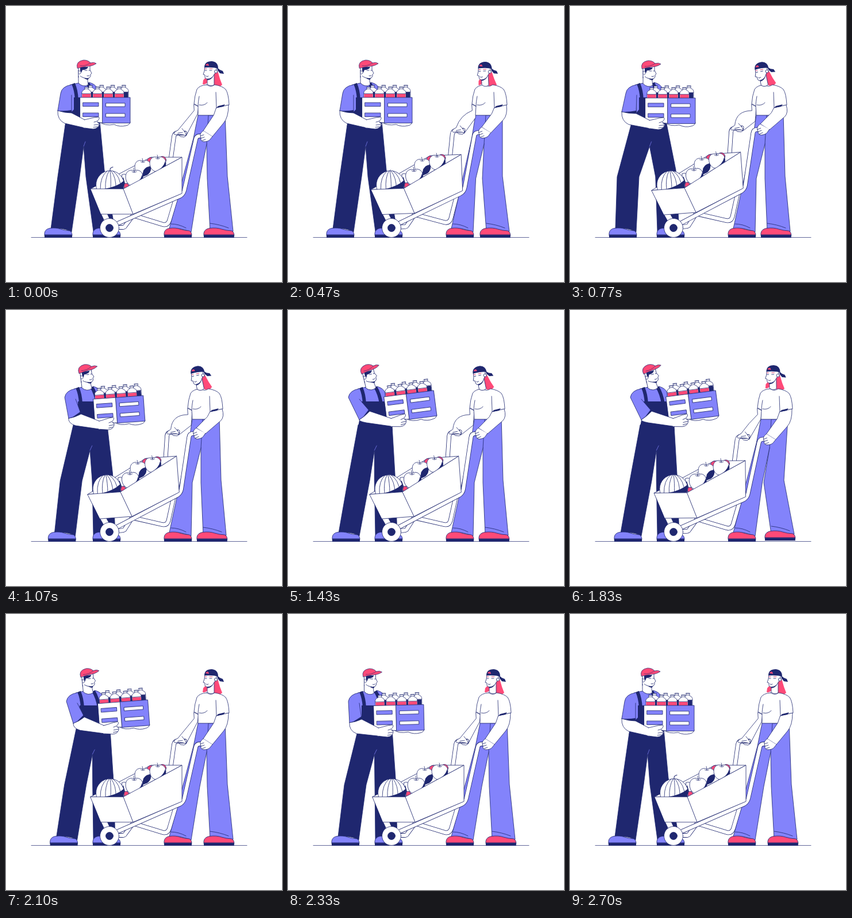
These frames come from a looping animation (480x480 px, 3000 ms). An HTML page:

```html
<!DOCTYPE html>
<html lang="en">
<head>
<meta charset="utf-8">
<title>Market delivery</title>
<style>
html, body { margin: 0; width: 100%; height: 100%; overflow: hidden; background: #fff; }
svg { display: block; width: 100vw; height: 100vh; }
</style>
</head>
<body>
<svg id="stage" viewBox="0 0 480 480" stroke-linejoin="round" stroke-linecap="round"></svg>
<script>
const NS = 'http://www.w3.org/2000/svg';
const NAVY = '#1f276f', LILAC = '#8383fb', PINK = '#ff4a78', WHITE = '#fff';
const LOOP = 3000;
const stage = document.getElementById('stage');

function add(parent, tag, attrs) {
  const node = document.createElementNS(NS, tag);
  for (const key in attrs) node.setAttribute(key, attrs[key]);
  parent.appendChild(node);
  return node;
}
const group = parent => add(parent, 'g', {});
const shape = (parent, fill, d = '', line = 0.8) =>
  add(parent, 'path', { d, fill, stroke: NAVY, 'stroke-width': line });
const flat = (parent, fill, d = '') => add(parent, 'path', { d, fill });
const line = (parent, d = '', color = NAVY, width = 0.8) =>
  add(parent, 'path', { d, fill: 'none', stroke: color, 'stroke-width': width });
const disc = (parent, cx, cy, r, fill) =>
  add(parent, 'circle', { cx, cy, r, fill, stroke: NAVY, 'stroke-width': 0.8 });
const box = (parent, x, y, width, height, fill) =>
  add(parent, 'rect', { x, y, width, height, fill, stroke: NAVY, 'stroke-width': 0.8 });

function tube(parent, d) {
  line(parent, d, NAVY, 7.8);
  line(parent, d, WHITE, 6.2);
}

// Smooth, never overshooting curve through [time, ...values] rows.
function track(rows) {
  const n = rows.length;
  const rate = (i, k) => (rows[i + 1][k] - rows[i][k]) / (rows[i + 1][0] - rows[i][0]);
  const slope = (i, k) => {
    if (i === 0 || i === n - 1) return 0;
    const a = rate(i - 1, k), b = rate(i, k);
    return a * b > 0 ? 2 * a * b / (a + b) : 0;
  };
  return t => {
    if (t <= rows[0][0]) return rows[0].slice(1);
    if (t >= rows[n - 1][0]) return rows[n - 1].slice(1);
    let i = 0;
    while (t > rows[i + 1][0]) i++;
    const span = rows[i + 1][0] - rows[i][0], u = (t - rows[i][0]) / span;
    const s = u * u * (3 - 2 * u);
    return rows[i].slice(1).map((v, j) => {
      const k = j + 1;
      return v + (rows[i + 1][k] - v) * s
        + span * u * (1 - u) * ((1 - u) * slope(i, k) - u * slope(i + 1, k));
    });
  };
}

function turn(x, y, deg, ox = 0, oy = 0) {
  const a = deg * Math.PI / 180, c = Math.cos(a), s = Math.sin(a);
  return [ox + (x - ox) * c - (y - oy) * s, oy + (x - ox) * s + (y - oy) * c];
}

// hip, kneeL, kneeR, shoe, torso, headX, headY, headTurn, sleeve outer xy, inner xy, elbow, crate xy, crateTurn
const manRest = [0, 0, 0, 0, 0, 0, 0, 0, 90, 182, 114, 186, 20, 129, 159, 0];
const manLift = [18, 14, 15, 10, 10, 9, 0, -13, 124, 191, 142, 176, 3, 167, 151, -7.3];
const manAt = track([
  [520, ...manRest],
  [770, 4, -8, 13, 1, 2, 1, 1, 0, 90, 184, 115, 187, 20, 131, 160, 0],
  [1330, ...manLift],
  [1830, ...manLift],
  [2330, 18, 8, 16, 9, 10, 6.5, 1, 0, 107, 189, 128, 183, 17, 149, 159.5, -1.3],
  [2700, ...manRest]
]);

// barrow turn, shirt, hip, headX, headY, headTurn, shoe, lift, knee, stem
const womanRest = [0, 0, 0, 0, 0, 0, 0, 0, 0, 1];
const womanLean = [-4.2, -11, -10, -18, 1, -12, -12, 0, -11, 0];
const womanAt = track([
  [200, ...womanRest],
  [470, -2.2, -7, -8, -13, 1, -3, -10, 0, -12, 0.4],
  [740, ...womanLean],
  [1410, ...womanLean],
  [1830, -0.5, -1, -2, -3, 0, -1, -5, -2, -13, 0],
  [2100, ...womanRest]
]);

function shoe(parent, color, x, size = 1) {
  const g = group(parent);
  shape(g, color, 'M0-4V-8Q1-15 9-16.5Q20-18 28-15Q35-12.5 44-12Q48-10 48-4Z');
  flat(g, NAVY, 'M0-5.5H48V0H0Z');
  return (dx, dy = 0) => g.setAttribute('transform', `translate(${x + dx} ${403 + dy}) scale(${size} 1)`);
}

line(stage, 'M44 402.5H419', NAVY, 0.7);

// Man
const man = group(stage);
const manLegs = shape(man, NAVY);
const manCrease = line(man, '', LILAC, 0.7);
const manShoe = shoe(man, LILAC, 67);
shoe(man, LILAC, 151)(0);
const manShirt = shape(man, LILAC);
const manBib = flat(man, NAVY);
const straps = line(man, '', NAVY, 6);
straps.setAttribute('stroke-linecap', 'butt');
const manSleeve = shape(man, LILAC);
const manCuff = flat(man, NAVY);

const manHead = group(man);
shape(manHead, WHITE, 'M126 113V134Q134 142 143 137L141 122Z');
flat(manHead, NAVY, 'M134 123Q138 127 144 125L143 128Q137 128 134 123Z');
shape(manHead, WHITE, 'M126 106V118Q130 125 141 126Q146 126 147 122L147 119L149 117L146 111V103Z');
flat(manHead, WHITE, 'M125.5 113H129V122H125.5Z');
line(manHead, 'M126 112V124');
flat(manHead, NAVY, 'M129 106H143L141 109Q135 112 133 111L131 116L129 112Z');
line(manHead, 'M127 113Q131 112 130 117Q129 119 127 118', NAVY, 0.7);
line(manHead, 'M137 112H141M144 112H146M141 121.5Q143 122 145 121', NAVY, 0.8);
shape(manHead, PINK, 'M124 108Q121 96 135 94Q143 94 147 99Q153 97 157 100Q150 105 140 105Z', 0.7);
line(manHead, 'M129 104Q138 105 147 99', NAVY, 0.6);

const crate = group(man);
shape(crate, WHITE, 'M34 43Q43 50 59 47Q69 52 80 49Q86 48 87 43Z');
function bottle(x, top, band) {
  const g = group(crate);
  g.setAttribute('transform', `translate(${x} ${top})`);
  shape(g, WHITE, `M-8 ${-top}V10Q-8 7-3 5V1H3V5Q8 7 8 10V${-top}Z`, 0.7);
  flat(g, band, `M-7.5 13H7.5V${-top}H-7.5Z`);
  line(g, 'M-3.5 1H3.5M-3 4H3M-8 12.5H8', NAVY, 0.7);
}
for (let i = 0; i < 4; i++) bottle(18 + 19.3 * i, -22, NAVY);
for (let i = 0; i < 4; i++) bottle(11 + 19 * i, -19, PINK);
shape(crate, WHITE, 'M0 0H39V44L0 42Z');
shape(crate, LILAC, 'M39 0H87V44.5H39Z');
for (const y of [9, 27]) {
  box(crate, 5, y, 27, 6.5, LILAC);
  box(crate, 45, y + 1, 33, 6, WHITE);
}
const manArm = shape(man, WHITE);
const manHand = group(man);
flat(manHand, WHITE, 'M4 39L8 39L34 34Q35 39 29 43L34 46Q32 54 23 55L6 53Z');
line(manHand, 'M7 39Q16 37 24 35L32 34Q35 36 30 41L24 43M30 42Q34 44 33 47Q31 55 22 55L7 53M32 47L24 48M30 51L23 52');

// Woman legs
const woman = group(stage);
const farLeg = shape(woman, LILAC);
const nearLeg = shape(woman, LILAC);
const folds = line(woman);
shoe(woman, PINK, 275)(0);
const womanShoe = shoe(woman, PINK, 344, 1.1);

// Barrow
const farArm = shape(stage, WHITE);
const barrow = group(stage);
tube(barrow, 'M311 221H299Q293 221 292 227L287 263');
line(barrow, 'M311 217.5V224.5');
shape(barrow, WHITE, 'M147 318L252 263H306L204 318Z');

function apple(x, y, r) {
  const g = group(barrow);
  g.setAttribute('transform', `translate(${x} ${y}) scale(${r / 15})`);
  shape(g, WHITE, 'M0-12C6-16 15-12 15-2C15 8 8 15 0 14C-8 15-15 8-15-2C-15-12-6-16 0-12Z');
  flat(g, NAVY, 'M14-6Q18 6 8 14Q2 17-5 14Q10 8 14-6Z');
  line(g, 'M-4-11Q0-8 4-11M0-10Q0-14-1-17');
}
disc(barrow, 272, 268, 6.5, PINK);
disc(barrow, 252, 270, 6.5, PINK);
apple(238, 281, 14);
flat(barrow, NAVY, 'M236 298L239 286Q244 278 252 279Q253 288 247 293Z');
apple(264, 275, 14);
shape(barrow, WHITE, 'M202 293Q208 291 212 296L211 310L202 312Z');
flat(barrow, NAVY, 'M198 304L204 298L208 312L204 318Z');
disc(barrow, 209, 313, 4.5, PINK);
apple(223, 299, 15);
disc(barrow, 181, 311, 24.5, WHITE);
flat(barrow, NAVY, 'M171 318Q194 314 205 304Q206 311 204 318Z');
line(barrow, 'M176 287Q164 296 164 318M179 287Q172 300 173 318M181 287Q183 300 182 318M183 287Q192 299 191 318M186 287Q199 296 200 318', NAVY, 0.8);
const stem = line(barrow, 'M0 0Q-1-6 5-7', NAVY, 1.1);

tube(barrow, 'M295 336L284 373Q281 382 273 380L224 365');
tube(barrow, 'M221 364L207 383Q206 385 202 385H186');
tube(barrow, 'M342 226H337Q331 226 330 232L310 321Q308 328 302 331L188 381');
shape(barrow, WHITE, 'M165 361L173 378L182 374L176 361Z');
shape(barrow, WHITE, 'M204 318L306 263V326L221 362Z');
shape(barrow, WHITE, 'M147 318H204L221 362H165Z');
disc(barrow, 180, 386, 16.5, WHITE);
disc(barrow, 180, 386, 6.5, NAVY);

// Woman upper body
const upper = group(stage);
const backHair = group(upper);
flat(backHair, PINK, 'M361 114Q367 110 369 116Q372 128 376 137Q370 143 362 138Z');
const sideHair = flat(backHair, PINK);
const shirt = shape(upper, WHITE);
const seams = line(upper);
const womanHead = group(upper);
flat(womanHead, WHITE, 'M350 121V136Q356 141 362 137V117Z');
line(womanHead, 'M350 126V136Q356 141 362 137V119');
flat(womanHead, NAVY, 'M350 126Q357 127 361 121Q358 128 350 129Z');
shape(womanHead, WHITE, 'M346 104L345 113L343 119L346 120Q345 127 350 127Q358 127 362 119L366 113V104Z');
disc(womanHead, 365, 114, 2.6, WHITE);
line(womanHead, 'M346 112H349M354 112H358M348 122Q350 123.5 352 122', NAVY, 0.8);
line(womanHead, 'M346 109H349M354 109H359', PINK, 1);
flat(womanHead, NAVY, 'M345 107Q345 96 358 96Q369 97 369 109Q361 106 345 107Z');
flat(womanHead, NAVY, 'M367 107L372 111L377 113L379 118L372 117L368 112Z');
flat(womanHead, PINK, 'M347 103Q349 99 352 101L353 104Z');

const farHand = group(upper);
shape(farHand, WHITE, 'M-6-6Q-12-4-13 0Q-12 3-6 1L3 2L8 4Q9 0 5-4L1-9');
line(farHand, 'M-6-1L2-2M-6 1L-2 5L5 6L9 2');
const nearArm = shape(upper, WHITE);
const cuff = flat(upper, NAVY);
const nearHand = group(upper);
flat(nearHand, WHITE, 'M-4-11Q-10-7-9-2L-8 2Q-9 7-3 8Q5 8 8 4L12-1Z');
line(nearHand, 'M-4-11Q-10-7-9-2L-8 2Q-9 7-3 8Q5 8 8 4L12-1M-9-2L-3-4M-8 2L-2 0M-6 6L0 4');

const setD = (node, d) => node.setAttribute('d', d);
const move = (node, value) => node.setAttribute('transform', value);

function drawMan(t) {
  const [h, kl, kr, s, b, hx, hy, ha, ox, oy, ix, iy, drop, cx, cy, ca] = manAt(t);
  const crotch = `${135 + h * 0.85} 244`;
  setD(manLegs, `M${104 + h} 200L${90 + kl} 297L${78 + s} 388Q${98 + s} 384 ${114 + s} 393
    L${128 + kl} 297L${crotch}L${139 + kr * 0.75} 297L152 392H190L${171 + kr} 285L${163 + h} 200Z`);
  setD(manCrease, `M${138 + h * 0.9} 236L${crotch}`);
  manShoe(s);
  setD(manShirt, `M${112 + b} 137L${126 + b} 134Q${135 + b} 142 ${145 + b} 133
    Q${156 + b} 136 ${159 + b} 144L${159 + b} 185H${114 + b}Z`);
  setD(manBib, `M${118 + b} 159L${118 + b} 180L${106 + h} 192L${102.5 + h} 210H${163.5 + h}
    L${161 + h} 185L${158 + b} 159Z`);
  setD(straps, `M${117 + b} 135Q${122 + b} 146 ${123 + b} 163M${142 + b} 134Q${149 + b} 145 ${152 + b} 163`);
  setD(manSleeve, `M${113 + b} 137Q${97 + b} 140 ${95 + b} 152L${ox} ${oy}
    Q${(ox + ix) / 2} ${(oy + iy) / 2 + 2} ${ix} ${iy}L${114 + b} 155`);
  setD(manCuff, `M${ox + 3} ${oy}Q${(ox + ix) / 2} ${(oy + iy) / 2 - 1} ${ix} ${iy - 5}L${ix} ${iy + 2}Z`);

  const place = `translate(${cx} ${cy}) rotate(${ca})`;
  move(crate, place);
  move(manHand, place);
  const [tx, ty] = turn(8, 39, ca), [ux, uy] = turn(8, 53, ca);
  setD(manArm, `M${ox} ${oy}Q${ox - 1} ${oy + drop * 0.8} ${ox + 12} ${oy + drop + 2}
    L${cx + ux} ${cy + uy}L${cx + tx} ${cy + ty}L${ix} ${iy}
    Q${(ox + ix) / 2} ${(oy + iy) / 2 + 2} ${ox} ${oy}Z`);
  move(manHead, `translate(${hx} ${hy}) rotate(${ha} 136 132)`);
}

function drawWoman(t) {
  const [bar, s, h, hx, hy, ha, f, lift, k, st] = womanAt(t);
  setD(nearLeg, `M${334 + h} 190L${326 + h * 0.8} 230L284 387Q303 385 322 393
    L${337 + h * 1.3} 300L${349 + h} 240L${352 + h} 190Z`);
  setD(farLeg, `M${336 + h} 190H${365 + h}L${381 + h} 188L${385 + k} 296L${395 + f} ${392 + lift}
    H${355 + f}L${350 + k} 300L${349 + h} 240Z`);
  setD(folds, `M287 379Q300 379 313 386M${355 + f} ${378 + lift}Q${372 + f} ${380 + lift} ${387 + f} ${386 + lift}`);
  womanShoe(f, lift);

  move(barrow, `rotate(${bar} 180 386)`);
  move(stem, `translate(181 287) scale(${Math.max(st, 0.01)})`);
  stem.setAttribute('opacity', st > 0.05 ? 1 : 0);

  setD(shirt, `M${349 + s} 137Q${336 + s} 138 ${332 + s} 145Q${328 + s} 156 ${327 + s} 170L${334 + s} 174
    L${334 + h} 190H${365 + h}L${366 + s} 177L${388 + s} 172Q${387 + s} 152 ${382 + s} 145
    Q${376 + s} 139 ${363 + s} 137Q${356 + s} 142 ${349 + s} 137Z`);
  setD(seams, `M${336 + s} 157Q${334 + s} 168 ${334 + s} 174M${365 + s} 150L${366 + s} 177
    M${336 + s} 172Q${345 + s} 174 ${350 + s} 168`);
  const headPlace = `translate(${hx} ${hy}) rotate(${ha} 356 134)`;
  move(womanHead, headPlace);
  move(backHair, headPlace);
  setD(sideHair, `M351 120L${343 - ha * 0.6} 129L${342 - ha * 0.75} 136Q347 137 352 132Z`);

  const [fx, fy] = turn(305, 222, bar, 180, 386);
  const bend = bar * 3;
  setD(farArm, `M${327 + s} 171L${335 + s} 175L${333 + s} ${188 - bend}L${fx + 8} ${fy + 4}L${fx - 6} ${fy - 6}
    Q${(fx + 321 + s) / 2 + bend} ${(fy + 176) / 2 + bend} ${327 + s} 182Z`);
  move(farHand, `translate(${fx} ${fy}) rotate(${bar})`);

  const [nx, ny] = turn(347, 228, bar, 180, 386);
  setD(nearArm, `M${366 + s} 177L${387 + s} 172Q${387 + s - bar} ${194 + bar * 2} ${378 + s - bar * 1.6} ${204 + bar * 2.8}
    L${nx + 12} ${ny - 1}L${nx - 4} ${ny - 11}L${361 + s} ${190 + bar}Z`);
  setD(cuff, `M${366 + s} 177L${369 + s} 174L${381 + s} 171L${378 + s} 175Z`);
  move(nearHand, `translate(${nx} ${ny}) rotate(${bar})`);
}

function render(t) {
  drawMan(t);
  drawWoman(t);
}

const start = performance.now();
function tick() {
  render((performance.now() - start) % LOOP);
  requestAnimationFrame(tick);
}
render(0);
requestAnimationFrame(tick);
</script>
</body>
</html>
```
